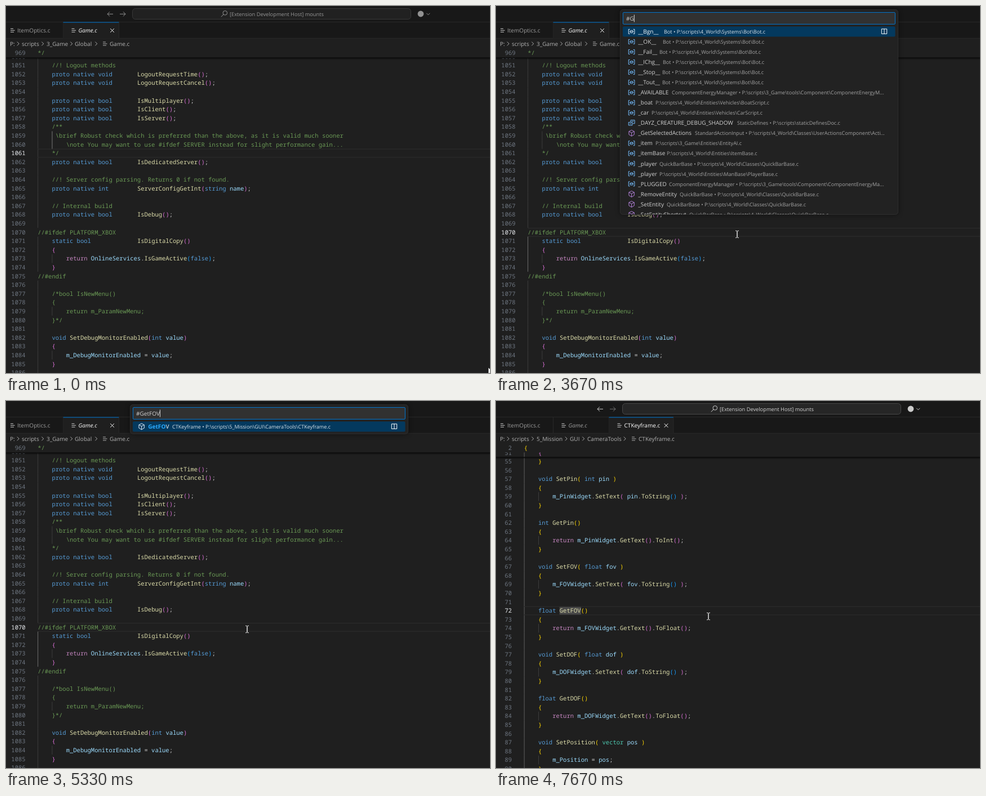
An HTML page that plays this animation: 859 px wide and 652 px high, repeating every 8 s.

```html
<!DOCTYPE html>
<html lang="en">
<head>
<meta charset="utf-8">
<title>Symbol search</title>
<style>
html, body { margin: 0; width: 100%; height: 100%; overflow: hidden; background: #1f1f1f; }
svg { display: block; width: 100vw; height: 100vh; }
text { white-space: pre; text-rendering: geometricPrecision; }
.ui { font-family: "Open Sans", "Noto Sans", sans-serif; font-size: 10.05px; fill: #d2d2d2; }
.code { font-family: "Noto Sans Mono", "DejaVu Sans Mono", monospace; font-size: 10.53px; fill: #ccc; }
.num { text-anchor: end; fill: #6e7681; }
.bold { font-weight: 700; fill: #2aaaff; }
.desc { font-size: 9.07px; fill: #a4a4a4; }
.line { fill: none; stroke: #ccc; stroke-width: 1; }
.dim { opacity: .68; }
</style>
</head>
<body>
<svg id="stage" viewBox="0 0 859 652"></svg>
<script>
const ROW = 15.6, LIST_ROW = 18.04;
const raw = String.raw;

const gameCode = raw`

    //! Logout methods
    proto native void       LogoutRequestTime();
    proto native void       LogoutRequestCancel();

    proto native bool       IsMultiplayer();
    proto native bool       IsClient();
    proto native bool       IsServer();
    /**
     \brief Robust check which is preferred than the above, as it is valid much sooner
        \note You may want to use #ifdef SERVER instead for slight performance gain...
    */
    proto native bool       IsDedicatedServer();

    //! Server config parsing. Returns 0 if not found.
    proto native int        ServerConfigGetInt(string name);

    // Internal build
    proto native bool       IsDebug();

//#ifdef PLATFORM_XBOX
    static bool             IsDigitalCopy()
    {
        return OnlineServices.IsGameActive(false);
    }
//#endif

    /*bool IsNewMenu()
    {
        return m_ParamNewMenu;
    }*/

    void SetDebugMonitorEnabled(int value)
    {
        m_DebugMonitorEnabled = value;
    }
`.split('\n').slice(1);

const setter = (name, v, type) => [`    void Set${name}( ${type} ${v} )`, '    {',
  `        m_${name}Widget.SetText( ${v}.ToString() );`, '    }', ''];
const getter = (name, type, conv) => [`    ${type} Get${name}()`, '    {',
  `        return m_${name}Widget.GetText().${conv}();`, '    }', ''];
const keyframeCode = ['', '', '    }', '',
  ...setter('Pin', 'pin', 'int'), ...getter('Pin', 'int', 'ToInt'),
  ...setter('FOV', 'fov', 'float'), ...getter('FOV', 'float', 'ToFloat'),
  ...setter('DOF', 'dof', 'float'), ...getter('DOF', 'float', 'ToFloat'),
  '    void SetPosition( vector pos )', '    {', '        m_Position = pos;', '    }'];

// Each row: description x | icon | label | description
const allSymbols = raw`298|v|__Bgn__|Bot • %4_World\Systems\Bot\Bot.c
296|v|__OK__|Bot • %4_World\Systems\Bot\Bot.c
290|v|__Fail__|Bot • %4_World\Systems\Bot\Bot.c
296|v|__IChg__|Bot • %4_World\Systems\Bot\Bot.c
295|v|__Stop__|Bot • %4_World\Systems\Bot\Bot.c
295|v|__Tout__|Bot • %4_World\Systems\Bot\Bot.c
312|v|_AVAILABLE|ComponentEnergyManager • %3_Game\tools\Component\ComponentEnergyM...
283|v|_boat|%4_World\Entities\Vehicles\BoatScript.c
276|v|_car|%4_World\Entities\Vehicles\CarScript.c
428|s|_DAYZ_CREATURE_DEBUG_SHADOW|StaticDefines • %staticDefinesDoc.c
353|m|_GetSelectedActions|StandardActionInput • %4_World\Classes\UserActionsComponent\Acti...
283|v|_item|%3_Game\Entities\EntityAI.c
303|v|_itemBase|%4_World\Entities\ItemBase.c
290|v|_player|QuickBarBase • %4_World\Classes\QuickBarBase.c
290|v|_player|%4_World\Entities\ManBase\PlayerBase.c
307|v|_PLUGGED|ComponentEnergyManager • %3_Game\tools\Component\ComponentEnergyMa...
326|m|_RemoveEntity|QuickBarBase • %4_World\Classes\QuickBarBase.c
303|m|_SetEntity|QuickBarBase • %4_World\Classes\QuickBarBase.c
343|m|_SetEntityShortcut|QuickBarBase • %4_World\Classes\QuickBarBase.c`;

const getSymbols = raw`398|m|GetFaceCoverageShaveValues|PlayerBase • %4_World\Entities\ManBase\PlayerBase.c
350|m|GetFallbackHitZone|AreaDamageComponentRaycasted • %4_World\Classes\AreaDamage\...
330|m|GetFallDamage|DayZPlayerImplement • %4_World\Entities\DayZPlayerImplement.c
384|m|GetFallDamageDebugData|DayZPlayerImplementFallDamage • %4_World\Entities\DayZPla...
386|m|GetFalseHeaderTextWidget|Attachments • %5_Mission\GUI\InventoryNew\Attachments.c
386|m|GetFalseHeaderTextWidget|AttachmentsWrapper • %5_Mission\GUI\InventoryNew\Contai...
361|m|GetFavoritedServerIds|ServerBrowserMenuNew • %5_Mission\GUI\NewUI\ServerBrowserM...
346|m|GetFavoriteServers|OnlineServices • %3_Game\Client\OnlineServices.c
346|m|GetFavoriteServers|BiosLobbyService • %3_Game\Services\BiosLobbyService.c
396|m|GetFeatureTimeAccelEnabled|FeatureTimeAccel • %3_Game\Static\TimeAccel.c
384|m|GetFeatureTimeAccelValue|FeatureTimeAccel • %3_Game\Static\TimeAccel.c
401|m|GetFeetDamageMoveModifier|PlayerBase • %4_World\Entities\ManBase\PlayerBase.c
309|m|GetFertility|Slot • %4_World\Entities\GardenBase\Slot.c
329|m|GetFertilityMax|Slot • %4_World\Entities\GardenBase\Slot.c
333|m|GetFertilityState|Slot • %4_World\Entities\GardenBase\Slot.c
331|m|GetFertilityType|Slot • %4_World\Entities\GardenBase\Slot.c
355|m|GetFertilizerQuantity|Slot • %4_World\Entities\GardenBase\Slot.c
376|m|GetFertilizerQuantityMax|Slot • %4_World\Entities\GardenBase\Slot.c
328|m|GetFileContent|PluginFileHandler • %4_World\Plugins\PluginBase\PluginFileHandler.c`;

const platformSymbol = raw`346|s|PLATFORM_XBOX|StaticDefines • %staticDefinesDoc.c`;
const fovSymbol = raw`295|m|GetFOV|CTKeyframe • %5_Mission\GUI\CameraTools\CTKeyframe.c`;

const text = (x, y, s, cls = 'ui', more = '') => `<text class="${cls}" x="${x}" y="${y}" ${more}>${s}</text>`;
const rect = (x, y, w, h, fill, more = '') => `<rect x="${x}" y="${y}" width="${w}" height="${h}" fill="${fill}" ${more}/>`;
const path = (d, more = '') => `<path class="line" d="${d}" ${more}/>`;
const group = (id, body) => `<g id="${id}" style="display:none">${body}</g>`;

// ---- code editor ----
const brackets = ['#ffd700', '#da70d6', '#179fff'];
const keywords = /^(proto|native|void|bool|int|static|float|string|false)$/;
let depth, inComment;

function tint(word, next) {
  if (keywords.test(word)) return '#569cd6';
  if (word === 'return') return '#c586c0';
  if (word === 'vector') return '#4ec9b0';
  return next === '(' ? '#dcdcaa' : '#9cdcfe';
}

function paint(line) {
  if (line.includes('/*')) inComment = true;
  if (inComment || line.includes('//')) {
    if (line.includes('*/')) inComment = false;
    return `<tspan fill="#6a9955">${line}</tspan>`;
  }
  return line.replace(/\w+|[(){}]|[^\w(){}]+/g, (s, i) => {
    let color = '#ccc';
    if (/[({]/.test(s)) color = brackets[depth++ % 3];
    else if (/[)}]/.test(s)) color = brackets[--depth % 3];
    else if (/\w/.test(s)) color = tint(s, line[i + s.length]);
    return `<tspan fill="${color}">${s}</tspan>`;
  });
}

const guide = (x, y, h, color) => rect(x, y, 0.9, h, color);

function editor(lines, first, mid, x, numX, color) {
  depth = 1;
  inComment = false;
  return lines.map((line, i) => {
    const y = mid + i * ROW, indent = line.search(/\S/);
    return (indent ? guide(x, y - ROW / 2, ROW, color) : '') +
      (indent > 4 ? guide(x + 25.3, y - ROW / 2, ROW, '#404040') : '') +
      text(numX, y + 3.7, first + i, 'code num') +
      text(x, y + 3.7, paint(line), 'code');
  }).join('');
}

const activeLine = (n, y, x, numX) =>
  rect(x, y - 7.8, 859, 1.2, '#2b2b2b') + rect(x, y + 6.8, 859, 1.2, '#2b2b2b') +
  text(numX, y + 3.7, n, 'code num', 'style="fill:#d0d0d0"');

const edge = y => rect(0, y, 859, 1.6, '#0a0a0a') + rect(0, y + 1.6, 859, 2, '#000', 'opacity=".25"');
const wordMark = (id, x, y, w) => group(id, rect(x, y, w, 15, '#484848'));

// ---- window chrome ----
const fileIcon = (x, y) => path(`M${x} ${y - 3}h5M${x} ${y}h7.5M${x} ${y + 3}h6`);
const chevron = (x, y) => path(`M${x - 1.7} ${y - 3.4}l3.4 3.4l-3.4 3.4`);
const cross = (x, y) => path(`M${x - 3.3} ${y - 3.3}l6.6 6.6m0 -6.6l-6.6 6.6`, 'style="stroke:#fff"');
const arrow = (x, dir, more) => path(`M${x - 5 * dir} 14.3h${10 * dir}m${-4 * dir} -4l${4 * dir} 4l${-4 * dir} 4`, more);

const titleBar = (id, cls, forward) => group(id, `<g class="${cls}">` +
  arrow(185, -1) + arrow(207, 1, `opacity="${forward}"`) +
  rect(224.5, 4.5, 494, 19, '#262626', 'rx="5" stroke="#484848"') +
  `<circle class="line" cx="388.8" cy="12.3" r="3.8"/>` + path('M386 15l-4.2 4.3') +
  text(397, 17.6, '[Extension Development Host] mounts', 'ui', 'style="font-size:9.27px"') +
  `<circle cx="736" cy="14" r="5.4" fill="#ccc"/>` + path('M746.3 12.8l3 3l3 -3') + '</g>');

const tab = (x, w, name, active, style = '') =>
  (active ? rect(x, 28.5, w, 29, '#1f1f1f') + rect(x, 28.5, w, 1, '#0078d4') : '') +
  rect(x + w - 0.5, 29, 0.9, 28, '#2b2b2b') + fileIcon(x + (x ? 15 : 8), 43.3) +
  text(x + (x ? 27 : 20), 47.4, name, 'ui', `style="fill:${active ? '#fff' : '#9d9d9d'};${style}"`);

function crumbs(parts, marks, iconX) {
  return '<g opacity=".82">' + parts.map(([x, s]) => text(x, 70.6, s)).join('') +
    marks.map(x => chevron(x, 67)).join('') + fileIcon(iconX, 67) + '</g>';
}

// ---- symbol picker ----
const icons = {
  m: ['#b180d7', 'M0 -5.4l4.7 2.4v5.6l-4.7 2.8l-4.7 -2.8v-5.6zM-4.7 -3l4.7 2.4l4.7 -2.4M0 -.6v6'],
  v: ['#75beff', 'M-3 -4h-2.3v8h2.3M3 -4h2.3v8h-2.3M-2.7 -.8l2.7 -1.4l2.7 1.2v2.2l-2.7 1.4l-2.7 -1.2zM-2.7 -.8l2.7 1.2l2.7 -1.4'],
  s: ['#75beff', 'M-1.5 -1.5v-3.5h7v6h-3.5M.5 -2.8h3.3M-5.3 -1.2h6.5v5.4h-6.5zM-3.6 1.5h3.2']
};

function rows(data, hits) {
  return data.split('\n').map((row, i) => {
    const [x, icon, label, desc] = row.split('|');
    const y = 45.4 + i * LIST_ROW, [color, shape] = icons[icon], top = i === 0;
    return (top ? rect(225, 36.4, 483.5, 18, '#04395e', 'rx="2"') +
        path('M684.3 40.8h9.4v8.6h-9.4zM689 40.8v8.6', 'style="stroke:#fff"') : '') +
      path(shape, `transform="translate(240.6 ${y})" style="stroke:${top ? '#e4eefa' : color}"`) +
      text(252.3, y + 3.6, `<tspan class="bold">${label.slice(0, hits)}</tspan>${label.slice(hits)}`,
        'ui', top ? 'style="fill:#fff"' : '') +
      text(x, y + 3.6, desc.replace('%', 'P:\\scripts\\'), 'ui desc', top ? 'style="fill:#dbe3ea"' : '');
  }).join('');
}

const thumb = (id, h) => group(id, rect(705.5, 37, 8, h, '#4d4d4d'));

// ---- scene ----
const gameY = 89.9, keyY = 76.1, gameX = 56.2, keyX = 49.7;
document.getElementById('stage').innerHTML =
  '<clipPath id="body"><rect y="76" width="859" height="576"/></clipPath>' +
  '<clipPath id="list"><rect x="220" y="34" width="494" height="336.2"/></clipPath>' +
  rect(0, 0, 859, 652, '#1f1f1f') + rect(0, 0, 859, 57.5, '#181818') +
  rect(0, 28, 859, 0.9, '#2b2b2b') + rect(0, 56.8, 859, 0.9, '#2b2b2b') +
  titleBar('titleIdle', 'dim', 1) + titleBar('titleLive', '', 1) + titleBar('titleLast', '', 0.5) +
  tab(0, 101.5, 'ItemOptics.c', false) +
  group('game',
    tab(101.5, 99, 'Game.c', true, 'font-style:italic') + cross(188.5, 43.5) +
    crumbs([[7, 'P:'], [28, 'scripts'], [72, '3_Game'], [122, 'Global'], [184, 'Game.c']], [21.5, 65, 116, 160], 172) +
    '<g clip-path="url(#body)">' + wordMark('xboxMark', 112.7, 394.3, 82.6) +
    editor(gameCode, 1050, gameY, gameX, 34.6, '#404040') +
    group('at1061', activeLine(1061, 261.5, gameX, 34.6) + guide(gameX + 25.3, 222.5, 31.2, '#707070')) +
    group('at1070', activeLine(1070, 401.9, gameX, 34.6) + guide(gameX, 409.7, 62.4, '#707070')) +
    '</g>' + rect(0, 76, 859, 15.7, '#1f1f1f') + edge(91.5) +
    text(34.6, 87, 969, 'code num') + text(gameX, 87, '*/', 'code', 'style="fill:#6a9955"')) +
  group('keyframe',
    tab(101.5, 99, 'Game.c', false, 'font-style:italic') + tab(200.5, 114.5, 'CTKeyframe.c', true) + cross(302, 43.5) +
    crumbs([[7, 'P:'], [28, 'scripts'], [72, '5_Mission'], [131, 'GUI'], [162, 'CameraTools'], [253, 'CTKeyframe.c']],
      [21.5, 65, 124.5, 155, 228.5], 241) +
    '<g clip-path="url(#body)">' + wordMark('fovMark', 112.7, 364.9, 38.4) +
    editor(keyframeCode, 53, keyY, keyX, 28, '#666') + activeLine(72, 372.5, keyX, 28) + '</g>' +
    group('sticky', rect(0, 76, 859, 23.5, '#1f1f1f') +
      text(28, 95.8, 51, 'code num') + text(keyX + 25.3, 95.8, '{', 'code', 'style="fill:#da70d6"') +
      rect(0, 76, 859, 15.4, '#1f1f1f') + text(28, 87, 2, 'code num') +
      text(keyX, 87, '{', 'code', 'style="fill:#ffd700"') + guide(keyX, 91.4, 8, '#666') + edge(99.3))) +
  group('picker',
    rect(220.4, 6.4, 493.2, 52, '#222', 'id="panel" rx="5" stroke="#303030" style="filter:drop-shadow(0 0 4px #0007)"') +
    rect(225.4, 11.4, 483, 21, '#313131', 'rx="1.5" stroke="#0078d4"') +
    rect(237.5, 15, 83.5, 13.5, '#264f78', 'id="selected"') + text(231, 25.6, '', 'ui', 'id="query"') +
    rect(0, 15.5, 1, 13, '#e0e0e0', 'id="caret"') +
    '<g clip-path="url(#list)">' + group('platform', rows(platformSymbol, 13)) + group('all', rows(allSymbols, 0)) +
    group('get', rows(getSymbols, 3)) + group('getF', rows(getSymbols, 4)) +
    group('getFO', rows(fovSymbol, 5)) + group('getFOV', rows(fovSymbol, 6)) + '</g>' +
    thumb('thumbShort', 17) + thumb('thumbLong', 33)) +
  group('beam', path('M-3 -6.3q3 0 3 1.3v10q0 1.3 -3 1.3M3 -6.3q-3 0 -3 1.3v10q0 1.3 3 1.3', 'style="stroke:#e6e6e6"')) +
  group('pointer', '<path d="M0 0v12.4l2.8 -2.6l2 4.6l2.2 -.9l-2 -4.6h3.9z" fill="#fff" stroke="#111" stroke-width=".7"/>');

// ---- timeline ----
const el = id => document.getElementById(id);
const show = (id, on) => { el(id).style.display = on ? '' : 'none'; };
const latest = (steps, t) => steps.filter(s => s[0] <= t).pop();

const typed = [[0, ''], [1870, '#PLATFORM_XBOX'], [2800, '#'], [3670, '#G'], [3730, '#Ge'],
  [3870, '#Get'], [4470, '#GetF'], [5070, '#GetFO'], [5330, '#GetFOV']];
const lists = [[0, ''], [2070, 'platform'], [3670, 'all'], [4200, 'get'], [4730, 'getF'],
  [5330, 'getFO'], [5600, 'getFOV']];
const track = [[0, 856, 642], [130, 835, 618], [270, 600, 465], [400, 370, 378], [470, 314, 369],
  [530, 334, 378], [600, 402, 398], [670, 428, 405.5], [7030, 428, 405.5], [7400, 390, 385.5],
  [7570, 390, 385.5], [7670, 377, 382.5], [8000, 377, 382.5]];

function mouseAt(t) {
  const i = Math.max(1, track.findIndex(p => p[0] > t));
  const [a, b] = [track[i - 1], track[i]];
  const k = (t - a[0]) / (b[0] - a[0]);
  return [a[1] + (b[1] - a[1]) * k, a[2] + (b[2] - a[2]) * k];
}

function draw(t) {
  const between = (a, b) => t >= a && t < b;
  const open = between(1870, 6130), second = t >= 6200;
  show('titleIdle', t < 1270);
  show('titleLive', between(1270, 1870) || between(6130, 6200));
  show('titleLast', second);
  show('game', !second);
  show('keyframe', second);
  show('at1061', t < 1330);
  show('at1070', t >= 1330);
  show('xboxMark', between(1800, 1870));
  show('sticky', t >= 6470);
  show('fovMark', between(6600, 7400) || t >= 7600);

  show('picker', open);
  const list = latest(lists, t)[1];
  for (const [, id] of lists) if (id) show(id, id === list);
  el('panel').setAttribute('height', !list ? 31 : /^(all|get|getF)$/.test(list) ? 364 : 52);
  show('thumbShort', between(3930, 4730));
  show('thumbLong', between(4730, 5330));
  show('selected', t < 2800);
  const query = el('query'), word = latest(typed, t)[1];
  if (query.textContent !== word) query.textContent = word;
  show('caret', between(2800, 5870));
  if (open) el('caret').setAttribute('x', 231 + query.getComputedTextLength());

  const arrowOn = t < 130 || between(6070, 6270);
  const [x, y] = t < 130 ? [856, 642] : arrowOn ? [426.5, 406] : mouseAt(Math.min(7999, Math.floor(t / 66.7 + 0.05) * 66.7));
  show('pointer', arrowOn);
  show('beam', !arrowOn);
  el(arrowOn ? 'pointer' : 'beam').setAttribute('transform', `translate(${x} ${y})`);
}

const start = performance.now();
function tick() {
  draw((performance.now() - start) % 8000);
  requestAnimationFrame(tick);
}
tick();
</script>
</body>
</html>
```
